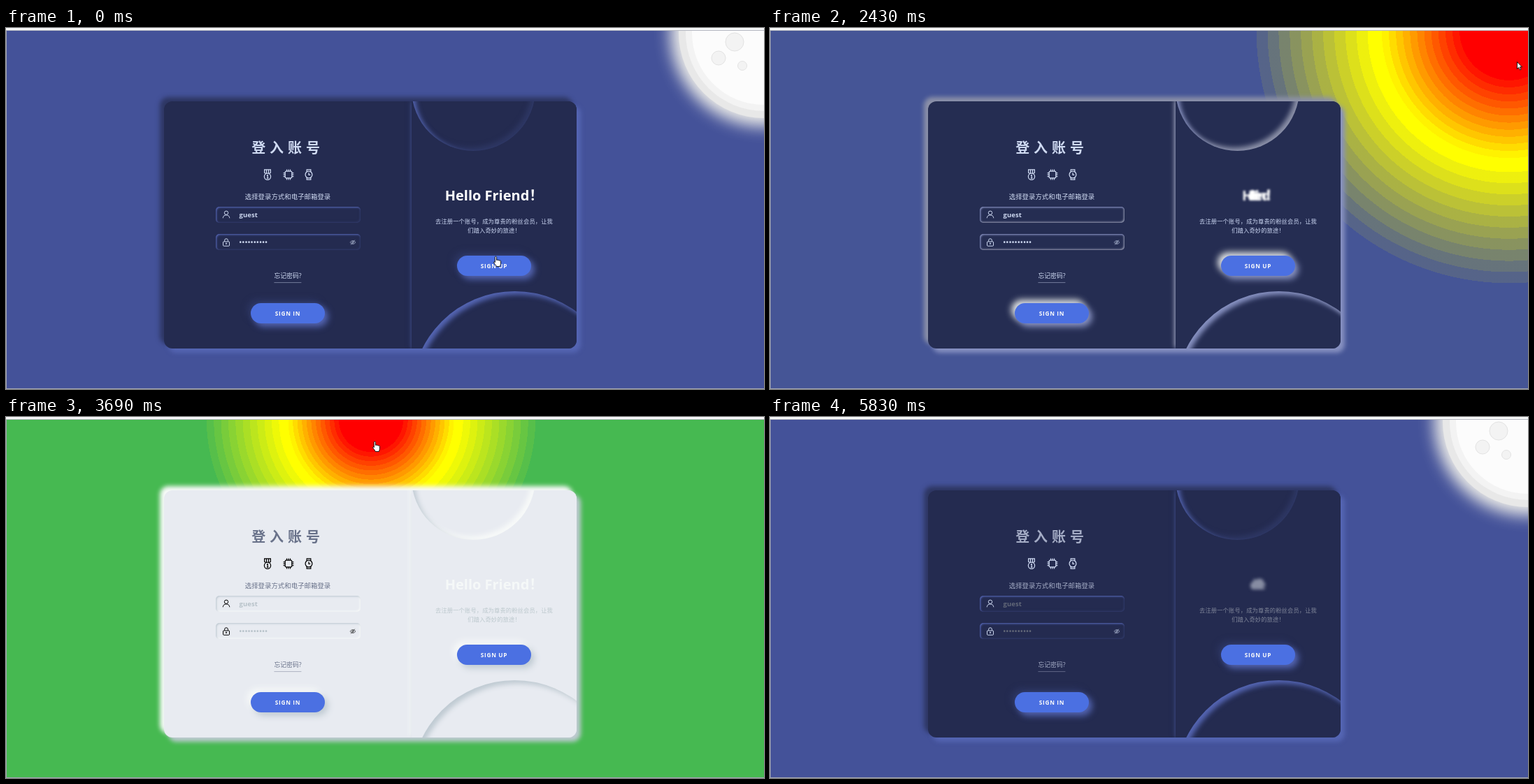
Animation of 1084 by 517 pixels, one loop 5.85 s. Source, as an HTML page:

```html
<!DOCTYPE html>
<html lang="zh-CN">
<head>
<meta charset="utf-8">
<title>Day and night login</title>
<style>
@property --p { syntax: '<number>'; inherits: true; initial-value: 0 }   /* panel slide */
@property --w { syntax: '<length>'; inherits: true; initial-value: 236px } /* panel width */
@property --h { syntax: '<number>'; inherits: true; initial-value: 1 }   /* heading tracking */
@property --s { syntax: '<number>'; inherits: true; initial-value: 0 }   /* sun travel */
@property --m { syntax: '<number>'; inherits: true; initial-value: 1 }   /* moon travel */
@property --bg { syntax: '<color>'; inherits: true; initial-value: #445299 }
@property --card { syntax: '<color>'; inherits: true; initial-value: #242b50 }
@property --dk { syntax: '<color>'; inherits: true; initial-value: #2e3763 }
@property --lt { syntax: '<color>'; inherits: true; initial-value: #5566b4 }
@property --bd { syntax: '<color>'; inherits: true; initial-value: #2e3763 }
@property --tx { syntax: '<color>'; inherits: true; initial-value: #cfdaf2 }
@property --in { syntax: '<color>'; inherits: true; initial-value: #cbd6ee }
@property --hi { syntax: '<color>'; inherits: true; initial-value: #fff }
@property --pa { syntax: '<color>'; inherits: true; initial-value: #cbd6f2 }
@property --ic { syntax: '<color>'; inherits: true; initial-value: #cfdaf2 }

:root {
  animation: slide 5.85s infinite, stretch 5.85s infinite, track 5.85s linear infinite,
    sun 5.85s infinite, moon 5.85s infinite, surface 5.85s linear infinite, ink 5.85s linear infinite;
}
@keyframes slide {
  0%, 8.55% { --p: 0; animation-timing-function: cubic-bezier(.323, .088, .395, .725) }
  21.37% { --p: .88; animation-timing-function: ease }
  39.3%, 100% { --p: 0 }
}
@keyframes stretch {
  0%, 10.3% { --w: 236px }
  14.6%, 18.9% { --w: 295px }
  27%, 100% { --w: 236px }
}
@keyframes track {
  0% { --h: 1 }
  6.7% { --h: .97 }
  23.59% { --h: .2 }
  29%, 35% { --h: 0 }
  41.54% { --h: .265 }
  49.23% { --h: .575 }
  60%, 70.3% { --h: 1 }
  74.87% { --h: .82 }
  97.5%, 100% { --h: 0 }
}
@keyframes sun { 0%, 40% { --s: 0 } 63.93%, 100% { --s: 1 } }
@keyframes moon {
  0%, 40% { --m: 1; animation-timing-function: step-start }
  68.4% { --m: 0; animation-timing-function: ease }
  92.3%, 100% { --m: 1 }
}
@keyframes surface {
  0%, 40% { --bg: #445299; --card: #242b50; --dk: #2e3763; --lt: #5566b4; --bd: #2e3763 }
  41.54% { --bg: #455596; --card: #252d52; --dk: #8d92a9; --lt: #8892c2; --bd: #e6e9e8 }
  49.23% { --bg: #457d7a; --card: #666f89; --dk: #f0f4f4; --lt: #ccd5e0; --bd: #eef2f2 }
  63.08%, 68.38% { --bg: #46b951; --card: #e8ebf1; --dk: #f8faf9; --lt: #bfcad2; --bd: #f8faf9 }
  70.26% { --dk: #9ba1ba; --lt: #919dc6; --bd: #9ba1ba }
  74.87% { --bg: #45a55d; --card: #d6dae1; --dk: #2d376b; --lt: #5566b4; --bd: #2d376b }
  93%, 100% { --bg: #445299; --card: #242b50; --dk: #2e3763; --lt: #5566b4; --bd: #2e3763 }
}
@keyframes ink {
  0%, 41.54% { --tx: #cfdaf2; --in: #cbd6ee; --hi: #fff; --pa: #cbd6f2; --ic: #cfdaf2 }
  49.23% { --tx: #c8d5ea; --in: #c3d2e8; --hi: #fff; --pa: #cbd6f2; --ic: #0a0a0a }
  63.08% { --tx: #69728a; --in: #b7c2c9; --hi: #f5f8f8; --pa: #bcc8cd; --ic: #000 }
  68.38% { --tx: #3a3f4b; --in: #a0a8b0; --hi: #eef4f8; --pa: #b4bfc6; --ic: #000 }
  74.87% { --tx: #15161b; --in: #6b7280; --hi: #bdd8fb; --pa: #8f949c; --ic: #7e859c }
  83% { --tx: #17181d; --in: #3e424c; --ic: #cfdaf2 }
  99.66%, 100% { --tx: #a4acc5; --in: #626878; --hi: #878da3; --pa: #7f8598; --ic: #cfdaf2 }
}

html, body { margin: 0; width: 100%; height: 100%; overflow: hidden }
body {
  position: relative; background: var(--bg);
  font: 9.44px/1 "Open Sans", "Noto Sans CJK SC", "Noto Sans CJK", sans-serif;
}
div, span, svg { position: absolute; box-sizing: border-box }
.frame { inset: 0; border: solid #a2a7b4; border-width: 0 0 1px 1px }
.bar { left: 0; top: 0; width: 100%; height: 4px; background: #f6f7f8; border-bottom: 1px solid #b4b7c0 }

.sun {
  left: calc(1084px - 562px * var(--s)); top: 4px; width: 470px; height: 470px; margin: -235px;
  transform: scale(calc(1.565 - .565 * var(--s)));
  animation: day 5.85s step-end infinite;
}
.moon {
  --r: calc(81px + 22px * var(--m));
  left: calc(522px + 562px * var(--m)); top: calc(2px + 5px * var(--m));
  width: calc(2 * var(--r)); height: calc(2 * var(--r)); margin: calc(-1 * var(--r));
  border-radius: 50%; background: #fcfcfc;
  box-shadow: 0 0 0 calc(16px * var(--m) - 7px) #f3f3f3,
    0 0 0 calc(2px + 17px * var(--m)) #e8e8e8,
    0 0 calc(13px + 9px * var(--m)) calc(6.6px + 24.4px * var(--m)) #ebebe8;
  animation: night 5.85s step-end infinite;
}
@keyframes day { 0% { visibility: hidden } 40% { visibility: visible } 68.4%, 100% { visibility: hidden } }
@keyframes night { 0% { visibility: visible } 40% { visibility: hidden } 68.4%, 100% { visibility: visible } }
.crater {
  --d: calc(var(--z) * 2px * (.65 + .35 * var(--m)));
  left: calc(50% + var(--x) * 1px * var(--m)); top: calc(50% + var(--y) * 1px);
  width: var(--d); height: var(--d); translate: -50% -50%; border-radius: 50%;
  background: rgb(0 0 0 / calc(.06 * var(--m) - .024)); border: 1px solid #e3e3e3;
}

.card {
  left: 226px; top: 105px; width: 590px; height: 354px; border-radius: 12px; overflow: hidden;
  background: var(--card);
  box-shadow: 5.9px 5.9px 5.9px var(--lt), -5.9px -5.9px 5.9px var(--dk);
}
.form { left: calc(236px * var(--p)); top: 0; width: 354px; height: 354px; color: var(--tx) }
.login { opacity: clamp(0, (.5 - var(--p)) * 1000, 1) }
.join { opacity: clamp(0, (var(--p) - .5) * 1000, 1) }
.mid { left: 50%; translate: -50% -50%; white-space: nowrap }
.title { font-size: 20px; font-weight: 700; letter-spacing: 5.9px }
.icon { width: 16px; height: 16px; translate: -50% -50%; fill: none; stroke: var(--ic); stroke-width: 1.25 }
.small { width: 12px; height: 12px; stroke-width: 1.3 }
.eye { width: 9px; height: 9px; opacity: .65; stroke-width: 1.6 }
.field {
  left: 73.5px; width: 207px; height: 23.6px; border-radius: 5px; padding-left: 34px;
  line-height: 23.6px; letter-spacing: .15px; color: var(--in);
  box-shadow: inset 1.2px 1.2px 2.4px var(--lt), inset -1.2px -1.2px 2.4px var(--dk);
}
.strong { font-weight: 700 }
.dots { letter-spacing: .55px }
.link { font-size: 8.85px; padding-bottom: 4px; border-bottom: 1px solid color-mix(in srgb, var(--tx) 45%, var(--card)) }
.btn {
  left: 50%; margin-left: -53px; width: 106px; height: 29.5px; border-radius: 15px;
  background: #4b70e2; color: #fafafa; font-weight: 700; font-size: 8.26px; line-height: 29.5px;
  letter-spacing: .68px; text-align: center;
  box-shadow: 4.7px 4.7px 9.4px var(--lt), -4.7px -4.7px 9.4px var(--bd);
}
.panel {
  left: calc(354px - 354px * var(--p)); top: 0; width: var(--w); height: 354px; overflow: hidden;
  background: var(--card);
}
.edge {
  left: calc(354px - 354px * var(--p)); top: 0; width: var(--w); height: 354px;
  box-shadow: 2.4px 2.4px 5.9px var(--lt), -2.4px -2.4px 5.9px var(--dk);
}
.disc { border-radius: 50%; box-shadow: inset 4.7px 4.7px 7px var(--lt), inset -4.7px -4.7px 7px var(--dk) }
.low { left: calc(-141.6px * var(--p)); top: 271.5px; width: 295px; height: 295px }
.high { left: calc(141.6px * var(--p)); top: -106px; width: 177px; height: 177px }
.side { inset: 0; color: var(--pa) }
.hello { opacity: calc(1 - var(--p)) }
.welcome { opacity: var(--p) }
.head {
  top: 135px; font-size: 20px; font-weight: 700; color: var(--hi);
  letter-spacing: calc((var(--h) - 1) * 9.9px); filter: blur(calc((1 - var(--h)) * 1.9px));
}
.para { font-size: 8.26px; letter-spacing: .15px; line-height: 13.4px; top: 178px; text-align: center }

.cursor { left: 0; top: 0; width: 16px; height: 18px; animation: move 5.85s linear infinite }
.cursor svg { left: 0; top: 0; width: 16px; height: 18px; stroke: #000; stroke-width: .9; fill: #fff }
.hand { animation: hand 5.85s step-end infinite }
.arrow { animation: arrow 5.85s step-end infinite }
@keyframes move {
  0% { transform: translate(696px, 326px) }
  6.67%, 9.2% { transform: translate(697px, 334px) }
  16% { transform: translate(560px, 340px) }
  21.37% { transform: translate(418px, 345px) }
  23.59%, 24.6% { transform: translate(414px, 346px) }
  32.3% { transform: translate(1073px, 57px) }
  38.9%, 41.54% { transform: translate(1068px, 48px) }
  49.23% { transform: translate(1015px, 87px) }
  53.8% { transform: translate(850px, 76px) }
  58.6% { transform: translate(640px, 50px) }
  63.08%, 68.4% { transform: translate(523px, 34px) }
  74.87% { transform: translate(541px, 42px) }
  84.3% { transform: translate(560px, 110px) }
  93%, 100% { transform: translate(640px, 520px) }
}
@keyframes hand {
  0% { opacity: 1 } 9.6% { opacity: 0 } 20.6% { opacity: 1 } 22.2% { opacity: 0 }
  33% { opacity: 1 } 40% { opacity: 0 } 60% { opacity: 1 } 68.4%, 100% { opacity: 0 }
}
@keyframes arrow {
  0% { opacity: 0 } 9.6% { opacity: 1 } 20.6% { opacity: 0 } 22.2% { opacity: 1 }
  33% { opacity: 0 } 40% { opacity: 1 } 60% { opacity: 0 } 68.4%, 100% { opacity: 1 }
}
</style>
</head>
<body>
<svg width="0" height="0">
  <symbol id="medal" viewBox="0 0 16 16"><path d="M3 .8h10M3.6.8v4.4l2 1.4M12.4.8v4.4l-2 1.4M6.5.8V6M9.5.8V6M6.9 9.6l1.3-.9v4.2M6.8 13h2.7"/><circle cx="8" cy="10.7" r="4.6"/></symbol>
  <symbol id="chip" viewBox="0 0 16 16"><rect x="3.2" y="3.2" width="9.6" height="9.6" rx="1.4"/><path d="M5.5 3V.6M8 3V.6M10.5 3V.6M5.5 13v2.4M8 13v2.4M10.5 13v2.4M3 5.5H.6M3 8H.6M3 10.500H.6M13 5.5h2.400M13 8h2.400M13 10.500h2.400"/></symbol>
  <symbol id="watch" viewBox="0 0 16 16"><circle cx="8" cy="8" r="4.9"/><path d="M5.200 4V.8h5.600V4M5.200 12v3.200h5.600V12M8 5.300V8.400h2.300"/></symbol>
  <symbol id="user" viewBox="0 0 16 16"><circle cx="8" cy="5" r="3.6"/><path d="M1.600 15c.4-4 3-5.800 6.400-5.800s6 1.800 6.400 5.800"/></symbol>
  <symbol id="lock" viewBox="0 0 16 16"><rect x="2" y="6.500" width="12" height="8.500" rx="1.500"/><path d="M4.800 6.300V4.200a3.200 3.200 0 0 1 6.400 0v2.100M8 9.300v3M6.500 9.600h3"/></symbol>
  <symbol id="eye" viewBox="0 0 16 16"><path d="M.8 8C4 2.500 12 2.500 15.200 8 12 13.500 4 13.500.8 8zM3 14L13 2"/><circle cx="8" cy="8" r="2.500"/></symbol>
</svg>

<div class="frame"></div>
<div class="sun" id="sun"></div>
<div class="moon">
  <div class="crater" style="--x:-42;--y:13;--z:13.5"></div>
  <div class="crater" style="--x:-65;--y:36;--z:10.5"></div>
  <div class="crater" style="--x:-31;--y:47;--z:7"></div>
</div>

<div class="card">
  <div class="form login">
    <span class="mid title" style="top:67px">登入账号</span>
    <svg class="icon" style="left:148px;top:105px"><use href="#medal"/></svg>
    <svg class="icon" style="left:177.500px;top:105px"><use href="#chip"/></svg>
    <svg class="icon" style="left:207px;top:105px"><use href="#watch"/></svg>
    <span class="mid" style="top:137px">选择登录方式和电子邮箱登录</span>
    <div class="field strong" style="top:150.500px">guest</div>
    <div class="field strong dots" style="top:189.500px">••••••••••</div>
    <svg class="icon small" style="left:89px;top:162px"><use href="#user"/></svg>
    <svg class="icon small" style="left:89px;top:201.500px"><use href="#lock"/></svg>
    <svg class="icon eye" style="left:270px;top:201.500px"><use href="#eye"/></svg>
    <span class="mid link" style="top:253px">忘记密码?</span>
    <div class="btn" style="top:288.500px">SIGN IN</div>
  </div>

  <div class="form join">
    <span class="mid title" style="top:80px">创建账号</span>
    <svg class="icon" style="left:148px;top:118px"><use href="#medal"/></svg>
    <svg class="icon" style="left:177.500px;top:118px"><use href="#chip"/></svg>
    <svg class="icon" style="left:207px;top:118px"><use href="#watch"/></svg>
    <span class="mid" style="top:149.500px">选择注册方式和电子邮箱注册</span>
    <div class="field" style="top:163.500px">用户名</div>
    <div class="field" style="top:192px">邮箱</div>
    <div class="field" style="top:220.500px">再次输入密码</div>
    <div class="btn" style="top:276px">SIGN UP</div>
  </div>

  <div class="edge"></div>
  <div class="panel">
    <div class="disc low"></div>
    <div class="disc high"></div>
    <div class="side hello">
      <span class="mid head">Hello Friend！</span>
      <span class="mid para">去注册一个账号，成为尊贵的粉丝会员，让我<br>们踏入奇妙的旅途！</span>
      <div class="btn" style="top:220.500px">SIGN UP</div>
    </div>
    <div class="side welcome">
      <span class="mid head">Welcome Back！</span>
      <span class="mid para">已经有账号了嘛，去登入账号来进入奇妙世界<br>吧！！！</span>
      <div class="btn" style="top:220.500px">SIGN IN</div>
    </div>
  </div>
</div>

<div class="bar"></div>
<div class="cursor">
  <svg class="hand" viewBox="0 0 16 18"><path d="M3.300 9.500V2.300c0-1.700 2.200-1.700 2.200 0v4.200c.3-.9 2-.8 2.100.3.400-.8 1.900-.6 2 .5.500-.7 1.900-.4 1.900.9v3c0 1.700-.9 2.300-1.100 4.300H5.200c-.3-1.800-2.600-3.600-3.500-5.500-.6-1.300.7-1.800 1.600-.5z"/></svg>
  <svg class="arrow" viewBox="0 0 16 18"><path d="M.5.500v10l2.300-2.100 1.600 3.500 1.700-.8-1.600-3.300h3.100z"/></svg>
</div>

<script>
// Hard-edged rings: red core, through orange to yellow, then fading out
const CORE = 19.6, YELLOW = 56, WARM = 13, FADE = 10;
const rings = [`red 0 ${CORE}%`];
const ring = (color, from, to, i, n) => {
  const edge = k => (from + (to - from) * k / n).toFixed(2) + '%';
  rings.push(`${color} ${edge(i)} ${edge(i + 1)}`);
};
for (let i = 0; i < WARM; i++)
  ring(`rgb(255 ${Math.min(255, 22 * (i + 1))} 0)`, CORE, YELLOW, i, WARM);
for (let i = 0; i < FADE; i++)
  ring(`rgb(255 255 0 / ${1 - (i + 1) / (FADE + 1)})`, YELLOW, 100, i, FADE);
document.getElementById('sun').style.background =
  `radial-gradient(closest-side, ${rings}, transparent 100%)`;
</script>
</body>
</html>
```
